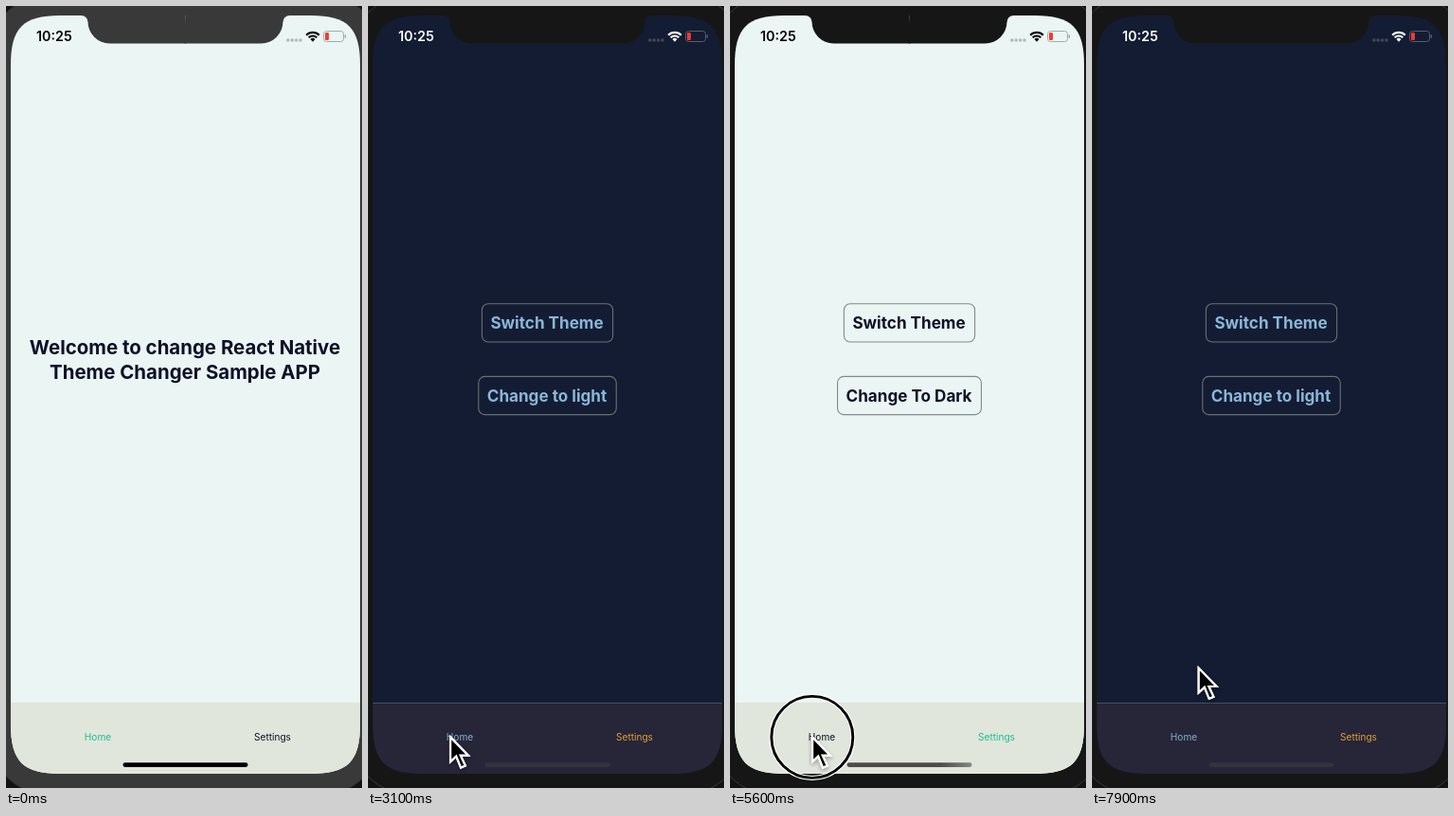
An HTML page with a canvas for the animation above (8 s loop, 376 px wide and 824 px high).

```html
<!DOCTYPE html>
<html lang="en">
<head>
<meta charset="utf-8">
<title>Theme changer</title>
<style>
html, body { margin: 0; width: 100%; height: 100%; overflow: hidden; background: #111; }
canvas { display: block; width: 376px; height: 824px; }
</style>
</head>
<body>
<canvas id="stage"></canvas>
<script>
const LOOP = 8000, STEP = 100, W = 376, H = 824, MID = 189.5;
const HOLD = 200;    // pointer stays down
const REACT = 300;   // tap to visible effect
const SETTLE = 100;  // pointer rests before a tap

const canvas = document.getElementById('stage');
const ratio = window.devicePixelRatio || 1;
canvas.width = W * ratio;
canvas.height = H * ratio;
const ctx = canvas.getContext('2d');

const light = {
  bg: '#ebf5f4', bar: '#e0e6db', line: '#e0e6db', text: '#0e1128', tab: '#0e1128', active: '#1fbd94',
  border: '#85898f', status: '#000', dots: '#b3babb', battery: '#a3aaab', second: 'Change To Dark'
};
const dark = {
  bg: '#131c33', bar: '#272538', line: '#435068', text: '#8ab7d8', tab: '#86b0cf', active: '#dfa03a',
  border: '#6a7072', status: '#fff', dots: '#41475a', battery: '#585c6b', second: 'Change to light'
};

const tap = (time, action, x, y) => ({ time, action, x, y });
const home = time => tap(time, 'home', 86, 768);
const settings = time => tap(time, 'settings', 281, 766);
const theme = (time, x, y) => tap(time, 'theme', x, y);

const taps = [
  tap(0, 'enter', 440, 640), settings(800), theme(2000, 191, 337),
  home(3200), settings(3900), theme(4650, 184, 409.5),
  home(5500), settings(6200), theme(7250, 187, 389), tap(8140, 'home', 93, 771)
];

const clamp = v => Math.max(0, Math.min(1, v));
const ease = k => k * k * (3 - 2 * k);
const mix = (a, b, k) => a + (b - a) * k;

function stateAt(t) {
  const s = { page: 'home', toggles: 0 };
  for (const { time, action } of taps) {
    if (t < time + REACT) break;
    if (action === 'theme') s.toggles++;
    else if (action !== 'enter') s.page = action;
  }
  s.colors = s.toggles % 2 ? dark : light;
  return s;
}

function pointer(t) {
  const i = taps.findIndex(p => p.time > t);
  const a = taps[i - 1], b = taps[i];
  const from = a.time + REACT, to = b.time - SETTLE;
  const k = ease(clamp((t - from) / (to - from)));
  return { x: mix(a.x, b.x, k), y: mix(a.y, b.y, k), down: t < a.time + HOLD };
}

// Buttons fade while touched, then fade back
function opacity(top, t) {
  const hit = taps.filter(p => p.action === 'theme' && p.time <= t).pop();
  if (!hit || hit.y < top || hit.y > top + 41) return 1;
  const age = t - hit.time;
  return age < REACT ? mix(1, 0.2, clamp(age / 150)) : mix(0.2, 1, clamp((age - REACT) / 250));
}

function round(x, y, w, h, r) {
  ctx.beginPath();
  ctx.roundRect(x, y, w, h, r);
}

// Rectangle with continuous-curvature corners of extent e
function squircle(x, y, w, h, e) {
  const c = e * 0.25, r = x + w, b = y + h;
  ctx.beginPath();
  ctx.moveTo(x, y + e);
  ctx.bezierCurveTo(x, y + c, x + c, y, x + e, y);
  ctx.lineTo(r - e, y);
  ctx.bezierCurveTo(r - c, y, r, y + c, r, y + e);
  ctx.lineTo(r, b - e);
  ctx.bezierCurveTo(r, b - c, r - c, b, r - e, b);
  ctx.lineTo(x + e, b);
  ctx.bezierCurveTo(x + c, b, x, b - c, x, b - e);
  ctx.closePath();
}

function label(str, x, y, size, weight, color, align = 'center') {
  ctx.font = `${weight} ${size}px Inter, sans-serif`;
  ctx.textAlign = align;
  ctx.fillStyle = color;
  ctx.fillText(str, x, y);
}

function bezel(color, edge) {
  ctx.fillStyle = '#121212';
  ctx.fillRect(0, 0, W, H);
  round(-17, -12, 413, 843, 62);
  ctx.fillStyle = color;
  ctx.fill();
  ctx.strokeStyle = edge;
  ctx.lineWidth = 1;
  ctx.stroke();
}

function notch(color) {
  const half = 103, ear = 7, r = 23, top = 10, bottom = 39.5;
  ctx.fillStyle = color;
  for (const side of [-1, 1]) {
    const edge = MID + side * half;
    ctx.beginPath();
    ctx.moveTo(MID, top - 1);
    ctx.lineTo(edge + side * ear, top - 1);
    ctx.lineTo(edge + side * ear, top);
    ctx.arcTo(edge, top, edge, top + ear, ear);
    ctx.arcTo(edge, bottom, edge - side * r, bottom, r);
    ctx.lineTo(MID - side, bottom);
    ctx.fill();
  }
}

function statusBar(c) {
  label('10:25', 32, 37.3, 14.3, 600, c.status, 'left');
  ctx.fillStyle = c.dots;
  for (let i = 0; i < 4; i++) {
    ctx.beginPath();
    ctx.arc(297.8 + i * 4.4, 36, 1.8, 0, 7);
    ctx.fill();
  }
  ctx.strokeStyle = ctx.fillStyle = c.status;
  ctx.lineWidth = 2.2;
  const wave = r => {
    ctx.beginPath();
    ctx.arc(324, 37.5, r, -Math.PI * 0.75, -Math.PI * 0.25);
  };
  for (const r of [9.6, 6]) {
    wave(r);
    ctx.stroke();
  }
  wave(3.5);
  ctx.lineTo(324, 37.8);
  ctx.fill();

  round(335.5, 26.5, 21, 11, 3);
  ctx.strokeStyle = ctx.fillStyle = c.battery;
  ctx.lineWidth = 1;
  ctx.stroke();
  round(357.6, 30, 1.4, 4, 0.7);
  ctx.fill();
  round(337, 28, 4, 8, 1.2);
  ctx.fillStyle = '#f23b30';
  ctx.fill();
}

function button(str, y, c, t) {
  ctx.globalAlpha = opacity(y, t);
  label(str, MID - 0.5, y + 26.6, 17.1, 700, c.text);
  const w = ctx.measureText(str).width + 19;
  round(MID - w / 2, y, w, 40.2, 6.5);
  ctx.strokeStyle = c.border;
  ctx.lineWidth = 1.1;
  ctx.stroke();
  ctx.globalAlpha = 1;
}

function indicator({ colors, toggles }) {
  let fill = colors === dark ? '#33333f' : '#000';
  if (colors === light && toggles) {
    fill = ctx.createLinearGradient(124, 0, 255, 0);
    fill.addColorStop(0.75, '#4c4c4a');
    fill.addColorStop(1, '#858783');
  }
  round(MID - 66, 797.3, 132, 4.6, 2.3);
  ctx.fillStyle = fill;
  ctx.fill();
}

function screen(s, t) {
  const c = s.colors, atHome = s.page === 'home';
  ctx.save();
  squircle(5, 10, 369, 799, 52);
  ctx.clip();
  ctx.fillStyle = c.bg;
  ctx.fillRect(0, 0, W, H);
  ctx.fillStyle = c.bar;
  ctx.fillRect(0, 734, W, 90);
  ctx.fillStyle = c.line;
  ctx.fillRect(0, 734, W, 1);
  if (atHome) {
    label('Welcome to change React Native', MID - 0.5, 366.8, 20.45, 700, c.text);
    label('Theme Changer Sample APP', MID - 0.5, 392.6, 20.45, 700, c.text);
  } else {
    button('Switch Theme', 313.8, c, t);
    button(c.second, 390.4, c, t);
  }
  label('Home', 97, 774.3, 10.1, 400, atHome ? c.active : c.tab);
  label('Settings', 281.5, 774.3, 10.1, 400, atHome ? c.tab : c.active);
  statusBar(c);
  indicator(s);
  ctx.restore();
}

function ring(x, y) {
  ctx.beginPath();
  ctx.arc(x + 0.8, y + 2.4, 43, 0, 7);
  for (const [color, width] of [['#fff', 5], ['#000', 2.9]]) {
    ctx.strokeStyle = color;
    ctx.lineWidth = width;
    ctx.stroke();
  }
}

const arrow = new Path2D('M1 2.4V26.6L6.8 21.2L11.4 32.6L15.8 30.7L11 20.5H18.7Z');

function cursor(x, y) {
  ctx.save();
  ctx.translate(x, y);
  ctx.scale(1.06, 1.06);
  ctx.lineWidth = 2.1;
  ctx.strokeStyle = '#fff';
  ctx.shadowColor = 'rgba(0,0,0,.4)';
  ctx.shadowBlur = 4 * ratio;
  ctx.shadowOffsetY = 2 * ratio;
  ctx.stroke(arrow);
  ctx.shadowColor = 'transparent';
  ctx.fill(arrow);
  ctx.stroke(arrow);
  ctx.restore();
}

function draw(t) {
  ctx.setTransform(ratio, 0, 0, ratio, 0, 0);
  const focused = t >= 1000;
  const frame = focused ? '#161616' : '#393939';
  bezel(frame, focused ? '#3a3a3a' : '#2a2a2a');
  screen(stateAt(t), t);
  notch(frame);
  const { x, y, down } = pointer(t);
  if (down) ring(x, y);
  ctx.fillStyle = '#000';
  cursor(x, y);
}

const start = performance.now();
function tick() {
  const t = (performance.now() - start) % LOOP;
  draw(Math.floor(t / STEP) * STEP);
  requestAnimationFrame(tick);
}
tick();
</script>
</body>
</html>
```
